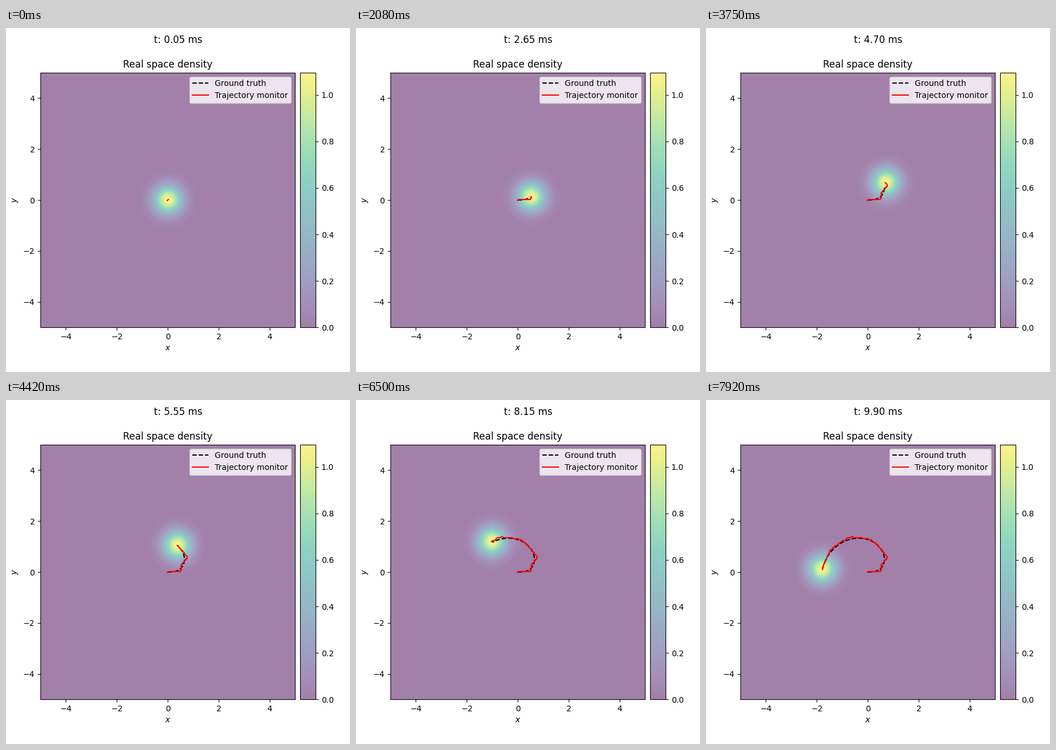
These frames come from a looping animation (600x600 px, 8000 ms). A matplotlib script:

```python
import numpy as np
import matplotlib.pyplot as plt
from matplotlib.animation import FuncAnimation

LOOP = 8000        # ms
FRAMES = 97        # the last one holds the end pose
DT = 0.05          # simulated ms per step
STEPS = 199
L, N = 5.0, 256    # half width of the box, grid points
PEAK = 1.096       # density at the centre of the cloud

# turning points of the cloud, evenly spaced in time
KEY_GAP = 1.1
KEYS = np.array([-0.001 - 0.0002j, 0.2 + 0.02j, 0.49 + 0.02j, 0.55 + 0.31j,
                 0.77 + 0.58j, 0.385 + 1.03j, 0.08 + 1.28j, -0.72 + 1.36j,
                 -1.46 + 0.86j, -1.79 + 0.11j])
SLOPES = np.gradient(KEYS) / 2


def cloud_centre(t):
    """Hermite curve through the turning points, slowing at each one."""
    i = np.clip((t / KEY_GAP).astype(int), 0, len(KEYS) - 2)
    u = t / KEY_GAP - i
    ease = u * u * (3 - 2 * u)
    return (KEYS[i] + (KEYS[i + 1] - KEYS[i]) * ease
            + SLOPES[i] * u * (1 - u) ** 2 - SLOPES[i + 1] * u * u * (1 - u))


def snap(v):
    """Nearest cell centre of the grid."""
    dx = 2 * L / N
    return (np.floor(v / dx) + 0.5) * dx


def spiral(t):
    u = t / 10
    s = u - 0.04 * np.sin(2 * np.pi * u)
    return 1.8 * s * np.exp(1j * np.pi * s**2)


def density(centre):
    gx = np.exp(-np.pi * PEAK * (grid - centre.real) ** 2)
    gy = np.exp(-np.pi * PEAK * (grid - centre.imag) ** 2)
    return PEAK * np.outer(gy, gx)


grid = (np.arange(N) + 0.5) * 2 * L / N - L
times = np.arange(STEPS) * DT
path = spiral(times)
cloud = cloud_centre(times)
seen_x, seen_y = snap(cloud.real), snap(cloud.imag)

# square plot, 2% gap and 6% colour bar share 80% of the width
side = 0.8 / 1.08
bottom = 0.5 - side / 2
fig = plt.figure(figsize=(6, 6), dpi=100)
ax = fig.add_axes([0.1, bottom, side, side])
cax = fig.add_axes([0.1 + 1.02 * side, bottom, 0.06 * side, side])

image = ax.imshow(density(cloud[0]), extent=[-L, L, -L, L], origin="lower",
                  cmap="viridis", alpha=0.5, vmin=0, vmax=PEAK)
fig.colorbar(image, cax=cax)
truth, = ax.plot([], [], "k--", label="Ground truth")
monitor, = ax.plot([], [], "r-", label="Trajectory monitor")
ax.set(xlim=(-L, L), ylim=(-L, L), xlabel="$x$", ylabel="$y$",
       title="Real space density")
ax.set_xticks(range(-4, 5, 2))
ax.set_yticks(range(-4, 5, 2))
ax.legend(loc="upper right")
clock = fig.suptitle("t: 0.05 ms")


def update(frame):
    n = min(frame * 25 // 12 + 2, STEPS)   # steps recorded so far
    image.set_data(density(cloud[n - 1]))
    truth.set_data(path.real[:n], path.imag[:n])
    monitor.set_data(seen_x[:n], seen_y[:n])
    clock.set_text(f"t: {times[n - 1]:.2f} ms")
    return image, truth, monitor, clock


anim = FuncAnimation(fig, update, frames=FRAMES, interval=LOOP / FRAMES,
                     repeat=True, repeat_delay=0, blit=False)
plt.show()
```
